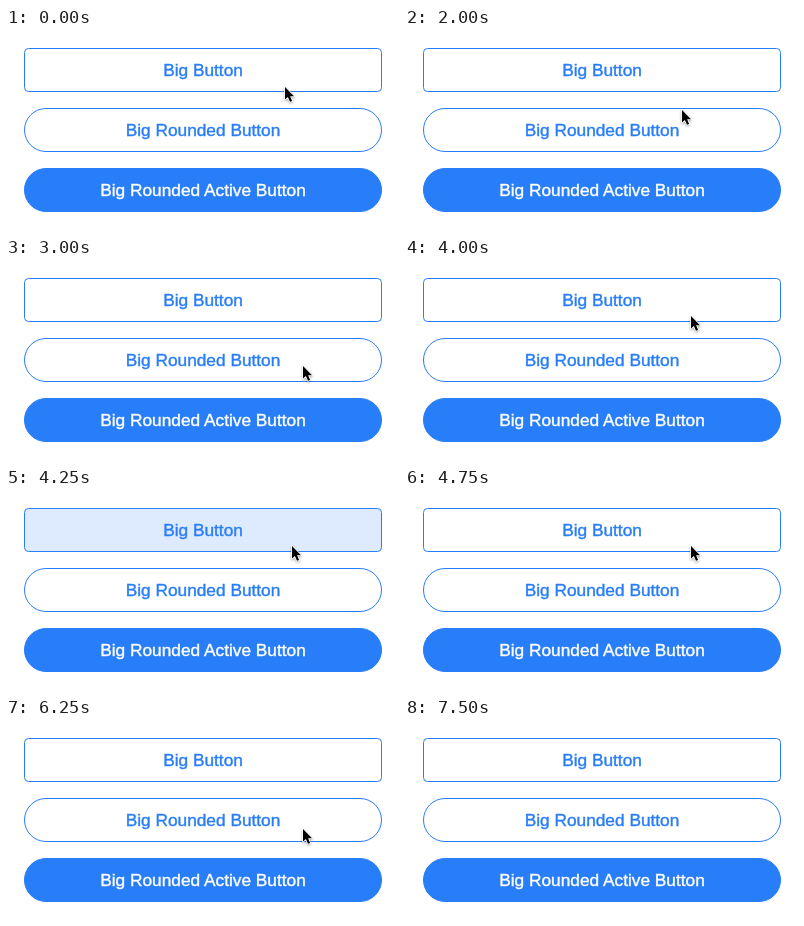
An HTML page that plays this animation: 393x202 px, repeating every 8.5 s.

```html
<!DOCTYPE html>
<html lang="en">
<head>
<meta charset="utf-8">
<title>Button states</title>
<style>
  html, body { margin: 0; width: 100%; height: 100%; overflow: hidden; background: #fff; }
  svg { display: block; width: 393px; height: 202px; }
  rect { fill: #fff; stroke: #287df8; stroke-width: 1; }
  rect.pressed { fill: #deebfe; }
  .active rect { fill: #287df8; }
  text {
    font: 17.3px "Liberation Sans", Arial, sans-serif;
    text-anchor: middle;
    fill: #287df8;
    stroke: #287df8;
    stroke-width: .4;
  }
  .active text { fill: #fff; stroke: #fff; }
  #cursor { filter: drop-shadow(0 1px 1px rgba(0, 0, 0, .35)); }
  #cursor path { fill: #000; stroke: #fff; stroke-width: 1.6; paint-order: stroke; stroke-linejoin: round; }
</style>
</head>
<body>
<svg viewBox="0 0 393 202">
  <g>
    <rect id="square" x="18.5" y="20.5" width="357" height="43" rx="4"/>
    <text x="197" y="48">Big Button</text>
  </g>
  <g>
    <rect id="rounded" x="18.5" y="80.5" width="357" height="43" rx="21.5"/>
    <text x="197" y="108">Big Rounded Button</text>
  </g>
  <g class="active">
    <rect x="18.5" y="140.5" width="357" height="43" rx="21.5"/>
    <text x="197" y="168">Big Rounded Active Button</text>
  </g>
  <g id="cursor"><path d="M0 0V12.6L2.9 9.9L5 14.8L7.1 13.9L5.1 9.2H9Z"/></g>
</svg>
<script>
  const LOOP = 8500;
  const STEP = 250;
  const TRAVEL = 3 * STEP;
  const HIDE_AT = 6500;

  // The pointer drifts off, then visits buttons; lag delays an axis within a move.
  const home = { x: 279, y: 59 };
  const moves = [
    { start: 0, length: STEP, x: 277, y: 50 },
    { start: 1750, length: TRAVEL, x: 297, y: 108, lagX: 1 / 3, button: "rounded", hold: STEP },
    { start: 3250, length: TRAVEL, x: 286, y: 58, lagX: 1 / 3, lagY: 1 / 4, button: "square", hold: 2 * STEP },
    { start: 4750, length: TRAVEL, x: 297, y: 111, button: "rounded", hold: 2 * STEP }
  ];

  const cursor = document.getElementById("cursor");
  const clamp = value => Math.min(1, Math.max(0, value));
  const easeOut = (progress, lag = 0) => 1 - (1 - clamp((progress - lag) / (1 - lag))) ** 2;
  const mix = (from, to, amount) => from + (to - from) * amount;

  function pointerAt(time) {
    return moves.reduce((point, move) => {
      const progress = (time - move.start) / move.length;
      return {
        x: mix(point.x, move.x, easeOut(progress, move.lagX)),
        y: mix(point.y, move.y, easeOut(progress, move.lagY))
      };
    }, home);
  }

  // A button is pressed one step after the pointer reaches it.
  function isPressed(id, time) {
    return moves.some(({ start, length, button, hold }) => {
      const held = time - (start + length + STEP);
      return button === id && held >= 0 && held < hold;
    });
  }

  function render(time) {
    const { x, y } = pointerAt(time);
    cursor.setAttribute("transform", `translate(${Math.round(x)} ${Math.round(y)})`);
    cursor.style.visibility = time < HIDE_AT ? "visible" : "hidden";
    for (const id of ["square", "rounded"]) {
      document.getElementById(id).classList.toggle("pressed", isPressed(id, time));
    }
  }

  const origin = performance.now();
  function tick() {
    const time = (performance.now() - origin) % LOOP;
    render(Math.floor(time / STEP) * STEP);
    requestAnimationFrame(tick);
  }
  tick();
</script>
</body>
</html>
```
